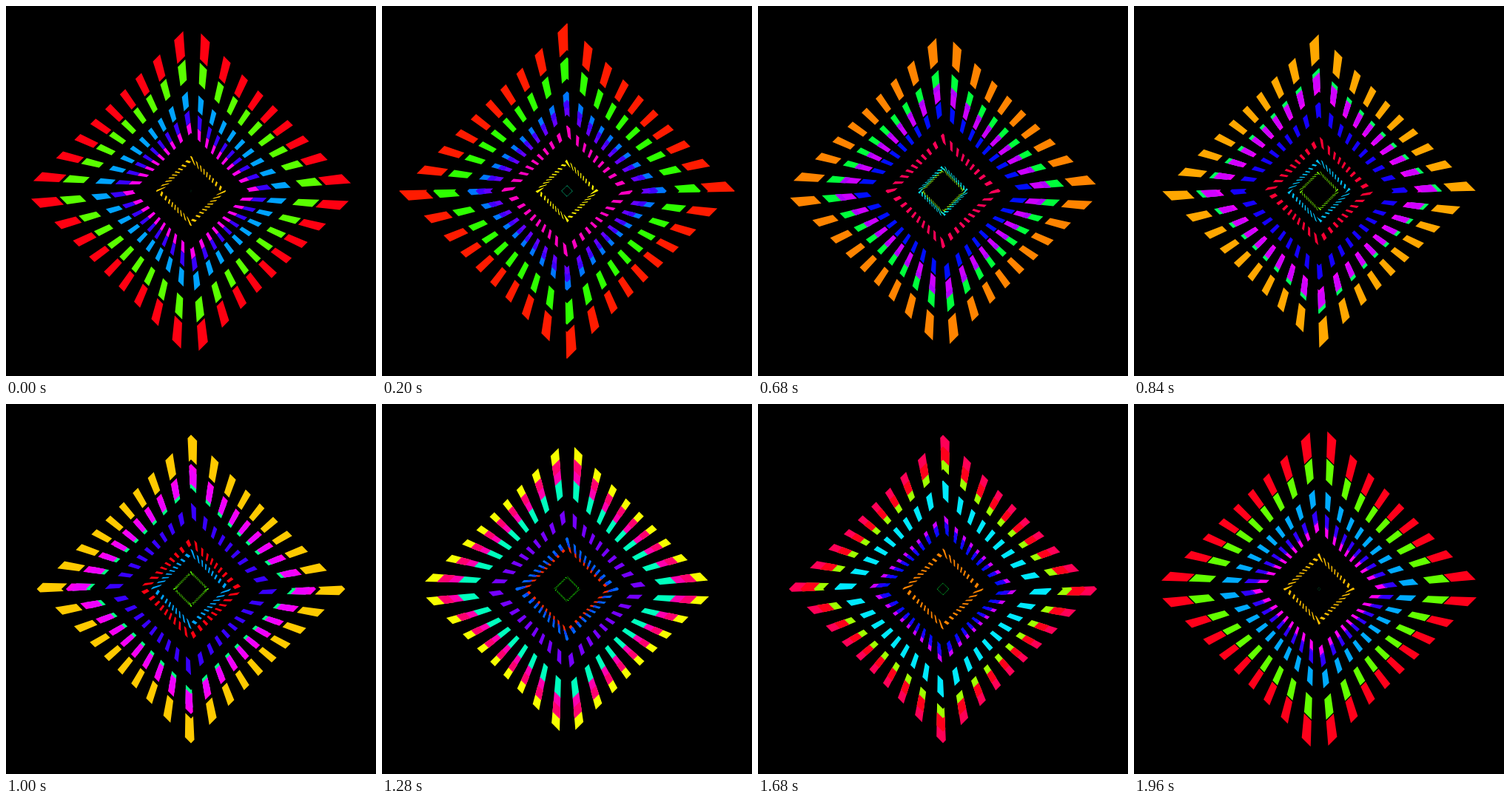
These frames come from a looping animation (500x500 px, 2000 ms). An HTML page with a canvas:

```html
<!DOCTYPE html>
<html lang="en">
<head>
<meta charset="utf-8">
<title>Diamond rings</title>
<style>
html, body { margin: 0; width: 100%; height: 100%; overflow: hidden; background: #000; }
canvas { display: block; width: 500px; height: 500px; }
</style>
</head>
<body>
<canvas id="stage" width="500" height="500"></canvas>
<script>
const ctx = document.getElementById('stage').getContext('2d');
const LOOP = 2000, STEP = 40;
const RINGS = 7, SHRINK = 5, GROW = 2;
const R_MAX = 230, LEAD = 0.03, INNER = 0.84;
const DASHES = 36, DASH_W = 3.6, START = 4.1, TURN = 30;
const SKEW = 5.2, SWIRL = 240, SWIRL_R = 15, HUE_START = -4;
const RAD = Math.PI / 180, QUARTER = Math.PI / 2;

// Triangle wave: five loops shrinking, two loops growing.
function radius(age) {
  const u = (age - LEAD + RINGS) % RINGS;
  return u < SHRINK ? R_MAX * (1 - u / SHRINK) : R_MAX * (u - SHRINK) / GROW;
}

function isGrowing(age) {
  return (age - LEAD + RINGS) % RINGS >= SHRINK;
}

// The dashes curl clockwise towards the middle.
function twist(r) {
  return Math.atan2(SKEW, r) + SWIRL * RAD * Math.exp(-r / SWIRL_R);
}

function rgb(hue) {
  const ch = n => {
    const k = (n + hue / 60) % 6;
    return 255 * (1 - Math.max(0, Math.min(k, 4 - k, 1)));
  };
  return [ch(5), ch(3), ch(1)];
}

// Top colour tinted by the one below, kept fully saturated.
function tint(top, below) {
  const mix = top.map((c, i) => 0.8 * c + 0.2 * below[i]);
  const low = Math.min(...mix), high = Math.max(...mix);
  return mix.map(c => 255 * (c - low) / (high - low || 1));
}

// Points of a diamond between two angles (clockwise from the top).
function edge(r, from, to) {
  const angles = [from];
  const corner = Math.ceil(from / QUARTER) * QUARTER;
  if (corner > from && corner < to) angles.push(corner);
  angles.push(to);
  return angles.map(a => {
    const s = Math.sin(a), c = Math.cos(a);
    const d = r / (Math.abs(s) + Math.abs(c));
    return [250 + d * s, 250 - d * c];
  });
}

function band(outer, inner, spin, color) {
  const twistOut = twist(outer), twistIn = twist(inner);
  ctx.fillStyle = `rgb(${color.map(Math.round).join(',')})`;
  ctx.beginPath();
  for (let i = 0; i < DASHES; i++) {
    const mid = spin + i * 360 / DASHES;
    const a = (mid - DASH_W / 2) * RAD, b = (mid + DASH_W / 2) * RAD;
    const pts = edge(outer, a + twistOut, b + twistOut)
      .concat(edge(inner, a + twistIn, b + twistIn).reverse());
    pts.forEach(([x, y], n) => n ? ctx.lineTo(x, y) : ctx.moveTo(x, y));
    ctx.closePath();
  }
  ctx.fill();
}

function draw(phase) {
  ctx.fillStyle = '#000';
  ctx.fillRect(0, 0, 500, 500);
  const spin = START + TURN * phase;
  const rings = Array.from({ length: RINGS }, (_, i) => {
    const age = i + phase, r = radius(age);
    return {
      outer: r, inner: r * INNER, growing: isGrowing(age),
      color: rgb((age * 720 / RINGS + HUE_START + 360) % 360)
    };
  });
  const back = rings.filter(r => !r.growing);
  const front = rings.filter(r => r.growing);
  for (const r of back.concat(front)) band(r.outer, r.inner, spin, r.color);
  for (const f of front) {
    for (const b of back) {
      const outer = Math.min(f.outer, b.outer), inner = Math.max(f.inner, b.inner);
      if (outer > inner) band(outer, inner, spin, tint(f.color, b.color));
    }
  }
}

const t0 = performance.now();
function tick() {
  const t = Math.max(0, performance.now() - t0) % LOOP;
  draw(Math.floor(t / STEP) * STEP / LOOP);
  requestAnimationFrame(tick);
}
tick();
</script>
</body>
</html>
```
